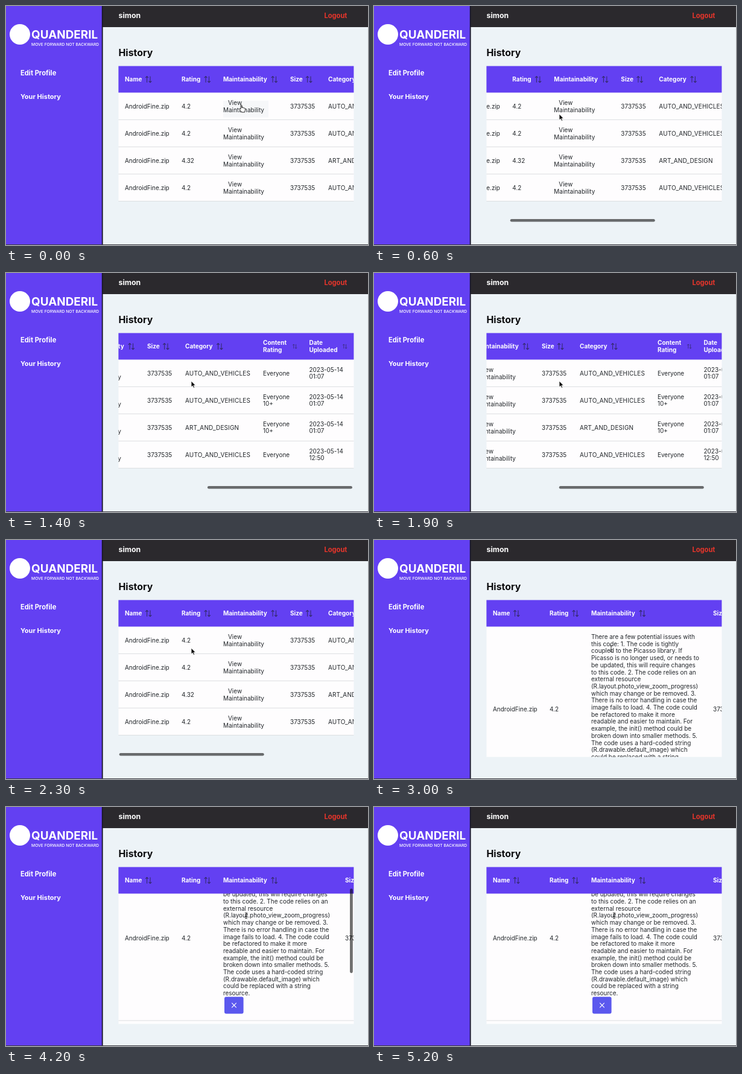
An HTML page that plays this animation: 600 px wide and 396 px high, repeating every 5300 ms.

```html
<!DOCTYPE html>
<html lang="en">
<head>
<meta charset="utf-8">
<title>History</title>
<style>
html, body { margin: 0; width: 100%; height: 100%; overflow: hidden; background: #edf3f7; }
svg { display: block; }
text { font-family: Inter, "Open Sans", sans-serif; white-space: pre; }
.b { font-weight: 700; }
.th { font-weight: 700; font-size: 10px; fill: #fff; }
.td { font-size: 9.95px; fill: #212529; }
.caps { letter-spacing: .18px; }
</style>
</head>
<body>
<svg id="stage" width="600" height="396" viewBox="0 0 600 396">
  <defs>
    <clipPath id="tableClip"><rect x="186.4" y="99.4" width="390" height="260"/></clipPath>
    <clipPath id="bodyClip"><rect x="186.4" y="143" width="390" height="216.4"/></clipPath>
  </defs>
  <rect width="600" height="396" fill="#edf3f7"/>
  <rect x="160" width="440" height="35" fill="#2b292d"/>
  <rect width="159" height="396" fill="#6340f2"/>
  <rect x="158.8" width="1.8" height="396" fill="#18162a"/>
  <rect y="395" width="600" height="1" fill="#3c3b42"/>

  <circle cx="23" cy="47" r="17" fill="#fff"/>
  <text class="b" x="42" y="54.4" font-size="18.9" fill="#fff">QUANDERIL</text>
  <text x="42" y="65.8" font-size="6.72" font-weight="500" fill="#fff">MOVE FORWARD NOT BACKWARD</text>
  <text class="b" x="24" y="115" font-size="11.2" fill="#fff">Edit Profile</text>
  <text class="b" x="24" y="154" font-size="11" fill="#fff">Your History</text>
  <text class="b" x="186.5" y="20" font-size="12.3" fill="#fff">simon</text>
  <text class="b" x="527.5" y="20" font-size="11.1" fill="#e8352b">Logout</text>
  <text class="b" x="186.5" y="82.6" font-size="15.9" fill="#0c0c0e">History</text>

  <g clip-path="url(#bodyClip)">
    <g id="closed"></g>
    <g id="open"></g>
  </g>
  <g clip-path="url(#tableClip)">
    <rect x="186" y="99" width="391" height="44.5" fill="#6340f2"/>
    <g id="head"><g id="headLeft"></g><g id="headRight"></g></g>
  </g>
  <rect id="barX" y="353" width="240" height="4.6" rx="2.3" fill="#000" fill-opacity=".56"/>
  <rect id="barY" x="570" width="4.8" height="140" rx="2.4" fill="#000" fill-opacity=".56"/>

  <g id="arrow"><path d="M0 0V10L2.3 7.9L3.9 11.4L5.6 10.6L4.1 7.2H7.2Z" fill="#111" stroke="#fff" stroke-width=".8"/></g>
  <g id="hand"><path d="M0 1C0-.5 2-.5 2 1V4.6C3-.2 0 4 3.6 4.3L4 5C4.6 4.2 5.6 4.6 5.7 5.4C6.4 4.9 7.4 5.3 7.4 6.4V8.6C7.4 10 6.6 10.6 6.5 12H1.4C1 10.4-.9 8.9-2 7.2C-2.6 6-1.3 5.3-.6 6.3L0 7Z" fill="#fff" stroke="#111" stroke-width=".9" stroke-linejoin="round"/></g>
  <g id="beam"><path d="M-2-5Q0-5 0-3.5Q0-5 2-5M0-3.5V3.5M-2 5Q0 5 0 3.5Q0 5 2 5M-1.2 1.5H1.2" fill="none" stroke="#333" stroke-width="1"/></g>
</svg>
<script>
const LOOP = 5300, STEP = 100;
const GROW = 228, WIDEN = 91;
const NS = 'http://www.w3.org/2000/svg';
const $ = id => document.getElementById(id);

function add(parent, tag, attrs, text) {
  const el = document.createElementNS(NS, tag);
  for (const k in attrs) el.setAttribute(k, attrs[k]);
  if (text) el.textContent = text;
  parent.appendChild(el);
  return el;
}
const label = (g, cls, x, y, str) => add(g, 'text', { class: cls, x, y }, str);

// Lines of one cell, centred on mid
function cell(g, cls, x, mid, str) {
  const lines = str.split('\n');
  lines.forEach((s, i) =>
    label(g, cls, x, mid + 3.8 + (i - (lines.length - 1) / 2) * 11.7, s));
}

function sortIcon(g, x, size) {
  add(g, 'path', {
    d: 'M2.6 11V.8M.2 3.2L2.6 .8L5 3.2M8 .8V11M5.6 8.6L8 11L10.4 8.6',
    transform: `translate(${x} ${121.6 - size * 5.9}) scale(${size})`,
    fill: 'none', stroke: '#34296f', 'stroke-width': 1.1
  });
}

function heading(g, x, str, iconX, size = 1) {
  cell(g, 'th', x, 121.4, str);
  sortIcon(g, iconX, size);
}

const left = $('headLeft'), right = $('headRight');
heading(left, 197, 'Name', 231);
heading(left, 291, 'Rating', 328.5);
heading(left, 360, 'Maintainability', 439.5);
heading(right, 471, 'Size', 497);
heading(right, 534, 'Category', 586);
heading(right, 663, 'Content\nRating', 712, .7);
heading(right, 739.5, 'Date\nUploaded', 795, .7);

const CAR = 'AUTO_AND_VEHICLES';
const rows = [
  ['4.2', CAR, 'Everyone', '01:07'],
  ['4.2', CAR, 'Everyone\n10+', '01:07'],
  ['4.32', 'ART_AND_DESIGN', 'Everyone\n10+', '01:07'],
  ['4.2', CAR, 'Everyone', '12:50']
];

const review = `There are a few potential issues with
this code: 1. The code is tightly
coupled to the Picasso library. If
Picasso is no longer used, or needs to
be updated, this will require changes
to this code. 2. The code relies on an
external resource
(R.layout.photo_view_zoom_progress)
which may change or be removed. 3.
There is no error handling in case the
image fails to load. 4. The code could
be refactored to make it more
readable and easier to maintain. For
example, the init() method could be
broken down into smaller methods. 5.
The code uses a hard-coded string
(R.drawable.default_image) which
could be replaced with a string
resource.`;

let hover;
function buildBody(g, open) {
  const extra = open ? GROW : 0, shift = open ? WIDEN : 0;
  add(g, 'rect', { x: 186, y: 143, width: 740, height: 180 + extra, fill: '#fefdfe' });
  rows.forEach(([rating, category, age, time], i) => {
    const big = open && i === 0;
    const top = 143.3 + 45 * i + (i ? extra : 0);
    const height = big ? 45 + extra : 45;
    const mid = top + height / 2;
    cell(g, 'td', 197, mid, 'AndroidFine.zip');
    cell(g, 'td', 291, mid, rating);
    if (big) {
      review.split('\n').forEach((s, n) => label(g, 'td', 360, 164 + n * 11.7, s));
      add(g, 'rect', { x: 362, y: 377, width: 31.6, height: 28, rx: 3, fill: '#5b58ee' });
      add(g, 'path', { d: 'M374.2 387.2L381.8 394.8M381.8 387.2L374.2 394.8', stroke: '#fff', 'stroke-width': 1.2 });
    } else {
      if (!open && !i) hover = add(g, 'rect', { x: 360, y: 157, width: 75, height: 27.5, fill: '#f6f7f9' });
      label(g, 'td', 368, mid - 2, 'View');
      label(g, 'td', 360, mid + 9.7, 'Maintainability');
    }
    cell(g, 'td', 471 + shift, mid, '3737535');
    cell(g, 'td caps', 534 + shift, mid, category);
    cell(g, 'td', 663 + shift, mid, age);
    cell(g, 'td', 739.5 + shift, mid, '2023-05-14\n' + time);
    add(g, 'rect', { x: 186, y: top + height - .4, width: 740, height: 1, fill: '#dcdee2' });
  });
}
buildBody($('closed'), false);
buildBody($('open'), true);

// Value at time t along [time, value] points
function along(points, t) {
  if (t <= points[0][0]) return points[0][1];
  for (let i = 1; i < points.length; i++) {
    const [t0, a] = points[i - 1], [t1, b] = points[i];
    if (t <= t1) return a + (b - a) * (t - t0) / (t1 - t0);
  }
  return points[points.length - 1][1];
}

const scrollX = [[300, 0], [500, 30], [800, 125], [1000, 181.5], [1200, 222], [1400, 237],
  [1700, 237], [1900, 193], [2100, 65], [2200, 15], [2300, 0]];
const scrollY = [[3300, 0], [3500, 14], [3800, 44], [4000, 55], [4200, 62.5]];
const fadeX = [[300, 0], [400, 1], [2400, 1], [2700, 0]];
const fadeY = [[3300, 0], [3400, 1], [4600, 1], [5100, 0]];
const mouseX = [[0, 389], [100, 307], [2300, 307], [2600, 389], [2800, 390], [3000, 393], [3400, 398]];
const mouseY = [[0, 164], [100, 179], [2300, 179], [2600, 164], [2800, 168], [3000, 180]];

const show = (id, on) => $(id).setAttribute('visibility', on ? 'visible' : 'hidden');
const move = (id, x, y) => $(id).setAttribute('transform', `translate(${x} ${y})`);

function draw(t) {
  const sx = along(scrollX, t), sy = along(scrollY, t);
  const open = t >= 2800;
  const over = t < 100 || (t >= 2600 && !open);
  show('closed', !open);
  show('open', open);
  hover.setAttribute('opacity', over ? 1 : 0);
  move('closed', -sx, 0);
  move('open', 0, -sy);
  move('head', -sx, 0);
  move('headRight', open ? WIDEN : 0, 0);

  $('barX').setAttribute('x', 187.7 + sx * .617);
  $('barX').setAttribute('opacity', along(fadeX, t));
  $('barY').setAttribute('y', 101.5 + sy * .54);
  $('barY').setAttribute('opacity', along(fadeY, t));

  const cursor = open ? 'beam' : over ? 'hand' : 'arrow';
  for (const id of ['arrow', 'hand', 'beam']) show(id, id === cursor);
  move(cursor, along(mouseX, t), along(mouseY, t));
}

const start = performance.now();
function tick(now) {
  const t = Math.max(0, now - start) % LOOP;
  draw(Math.floor(t / STEP) * STEP);
  requestAnimationFrame(tick);
}
draw(0);
requestAnimationFrame(tick);
</script>
</body>
</html>
```
